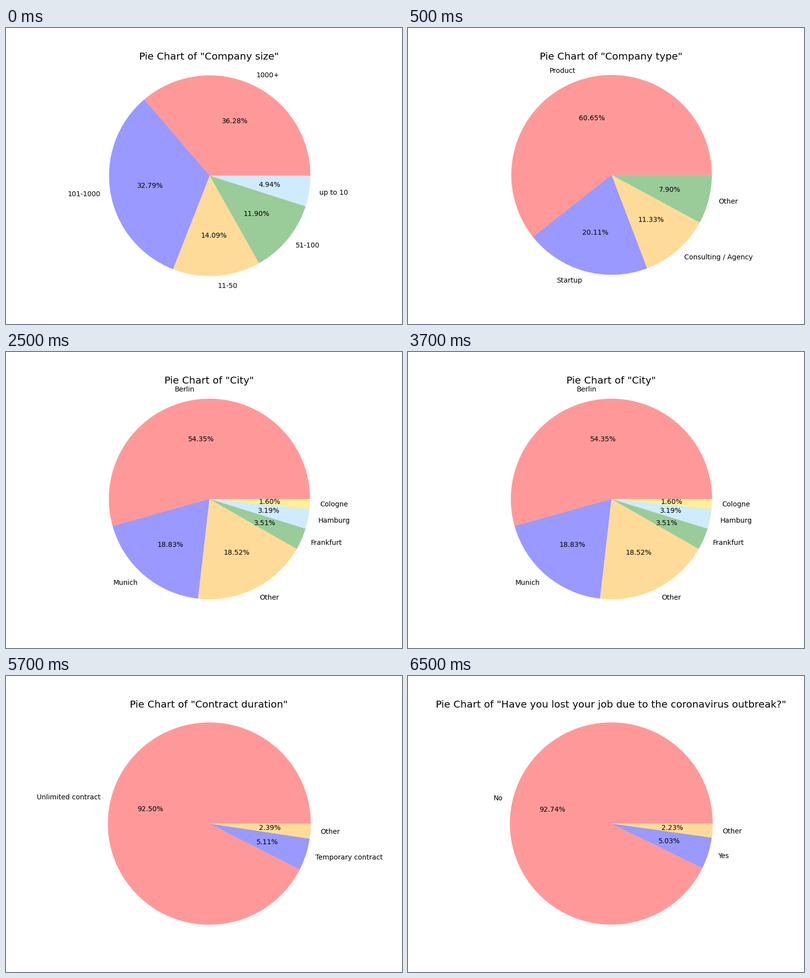
These frames come from a looping animation (800 px wide and 600 px high, 8 s). A matplotlib script:

```python
import matplotlib.pyplot as plt
import numpy as np
from matplotlib.animation import FuncAnimation

plt.rcParams.update({"font.family": "DejaVu Sans", "font.size": 10})

STEP_MS = 500
FRAMES = 16
COLORS = ["red", "blue", "orange", "green", "lightskyblue", "gold"]

CHARTS = [
    ("Company size",
     {"1000+": 448, "101-1000": 405, "11-50": 174, "51-100": 147, "up to 10": 61}),
    ("Company type",
     {"Product": 760, "Startup": 252, "Consulting / Agency": 142, "Other": 99}),
    ("City",
     {"Berlin": 681, "Munich": 236, "Other": 232,
      "Frankfurt": 44, "Hamburg": 40, "Cologne": 20}),
    ("Contract duration",
     {"Unlimited contract": 1159, "Temporary contract": 64, "Other": 30}),
    ("Have you lost your job due to the coronavirus outbreak?",
     {"No": 1162, "Yes": 63, "Other": 28}),
]

fig = plt.figure(figsize=(8, 6), dpi=100, facecolor="white")
fig.subplots_adjust(left=0.125, right=0.9, bottom=0.125, top=0.88)
ax = fig.add_subplot()


def fit_view(wedges):
    """Equal scaling around the wedge outlines with a 5% margin."""
    points = np.concatenate([w.get_path().vertices for w in wedges])
    low, high = points.min(axis=0), points.max(axis=0)
    mid_x, mid_y = (low + high) / 2
    half_h = 0.55 * (high[1] - low[1])
    box = ax.get_position(original=True)
    half_w = half_h * (box.width * 8) / (box.height * 6)
    ax.set_aspect("auto")
    ax.set_xlim(mid_x - half_w, mid_x + half_w)
    ax.set_ylim(mid_y - half_h, mid_y + half_h)


def draw_chart(title, counts):
    ax.clear()
    wedges, _, _ = ax.pie(
        list(counts.values()), labels=list(counts), colors=COLORS,
        autopct="%.2f%%", wedgeprops={"alpha": 0.4})
    fit_view(wedges)
    ax.set_title(f'Pie Chart of "{title}"', fontsize=14.4)


def update(frame):
    # The first chart lasts one step, the following ones four steps each.
    draw_chart(*CHARTS[(frame + 3) // 4])
    return []


anim = FuncAnimation(fig, update, frames=FRAMES, interval=STEP_MS,
                     init_func=lambda: update(0), repeat=True, repeat_delay=0)
plt.show()
```
